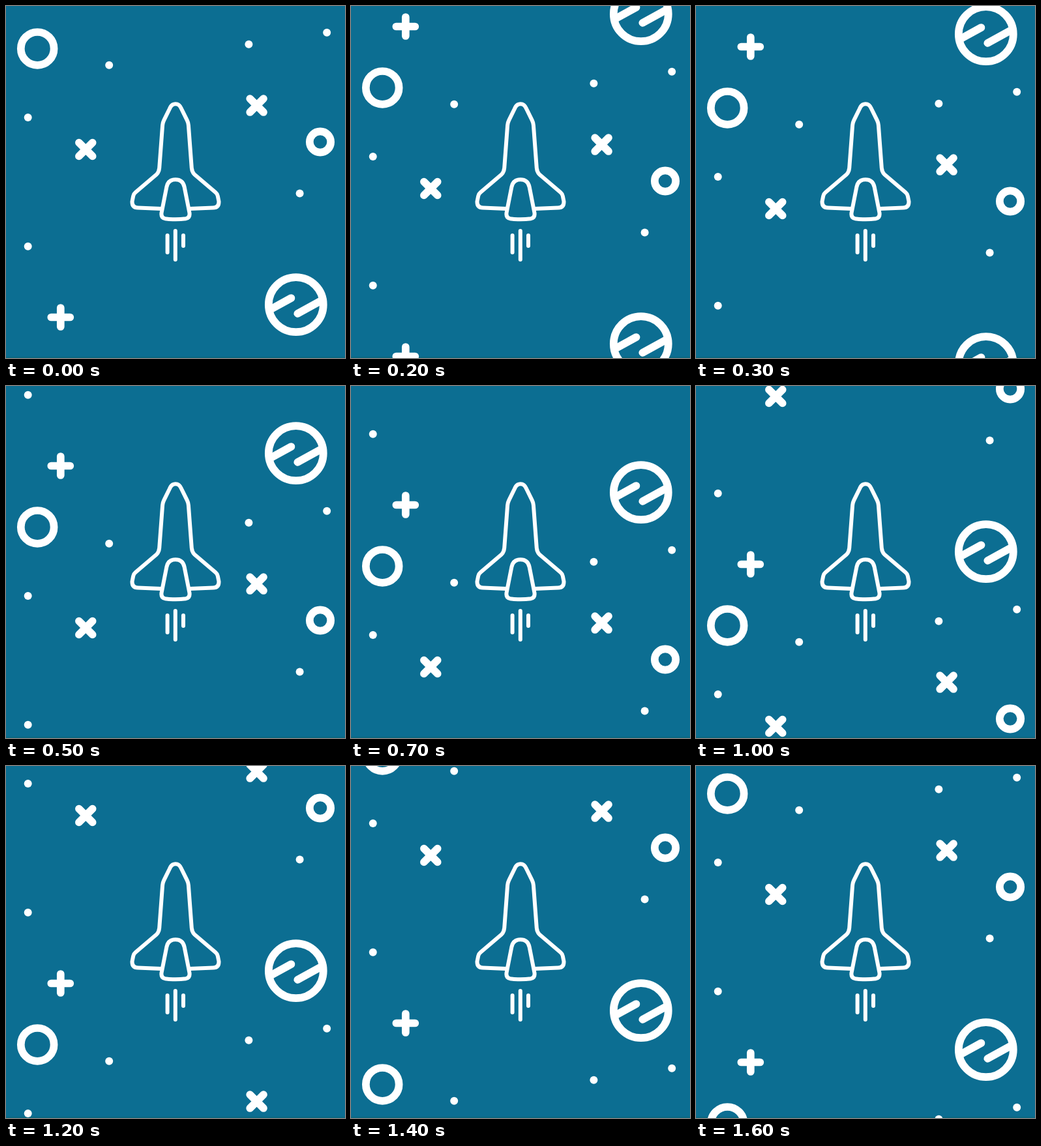
Write an HTML page that moves like this. It is 520 by 540 pixels and loops after 1700 ms.

```html
<!DOCTYPE html>
<html lang="en">
<head>
<meta charset="utf-8">
<title>Rocket in space</title>
<style>
  html, body { margin: 0; width: 100%; height: 100%; overflow: hidden; background: #0c6e92; }
  .stage { position: relative; width: 520px; height: 540px; overflow: hidden; background: #0c6e92; }
  .stage::before { content: ""; position: absolute; left: 0; right: 0; bottom: 0; height: 2px; background: #0b6881; }
  svg { position: absolute; left: 0; top: 0; display: block; fill: none; stroke: #fff; stroke-linecap: round; stroke-linejoin: round; }
  .sky { top: -506px; stroke-width: 11.7; animation: fall 1.7s steps(17, end) infinite; }
  .ship { stroke-width: 6; }
  .dots { fill: #fff; stroke: none; }
  /* the sky repeats every 506px and drops about 30px per step */
  @keyframes fall { from { top: -506px; } to { top: 7.4px; } }
</style>
</head>
<body>
<div class="stage">
  <svg class="sky" width="520" height="1060" viewBox="0 0 520 1060">
    <defs>
      <path id="cross" d="M-10.4-10.4 10.4 10.4M10.4-10.4-10.4 10.4"/>
      <g id="tile">
        <circle cx="48.2" cy="65.4" r="25.4"/>
        <circle cx="482" cy="208.5" r="16.2"/>
        <circle cx="444.8" cy="458.2" r="42"/>
        <path d="M437.5 448 405 465.8M447.3 471.8 485 451.2"/>
        <path d="M69.3 477.5h29M83.8 463v29"/>
        <use href="#cross" x="122.3" y="220"/>
        <use href="#cross" x="384.6" y="152.6"/>
        <g class="dots">
          <circle cx="158.2" cy="90.7" r="6"/>
          <circle cx="372.4" cy="58.7" r="6"/>
          <circle cx="492.2" cy="40.7" r="6"/>
          <circle cx="33.7" cy="171.1" r="6"/>
          <circle cx="33.7" cy="368.7" r="6"/>
          <circle cx="450.6" cy="287.6" r="6"/>
        </g>
      </g>
    </defs>
    <use href="#tile"/>
    <use href="#tile" y="506"/>
  </svg>
  <svg class="ship" width="520" height="540" viewBox="0 0 520 540">
    <path d="M238 311 202 309.6Q193.3 309.2 193.5 300L195.2 291.5Q195.8 288.3 198.5 286L230.5 258.8Q234.6 255 235.2 248.5L240.1 183Q240.4 179 242.2 175.4L251 157.5Q254 150.2 260 150.2Q266 150.2 269 157.5L277.8 175.4Q279.6 179 279.9 183L284.8 248.5Q285.4 255 289.5 258.8L321.5 286Q324.2 288.3 324.8 291.5L326.5 300Q326.7 309.2 318 309.6L282 311"/>
    <path d="M246.4 277.5C248 270 253 266.2 260 266.2S272 270 273.6 277.5L281.4 317Q282.6 324.6 276 326.2Q268 327.3 260 327.3T244 326.2Q237.4 324.6 238.6 317Z"/>
    <path d="M247.6 352v26M259.8 345v44M272 352v16"/>
  </svg>
</div>
</body>
</html>
```
